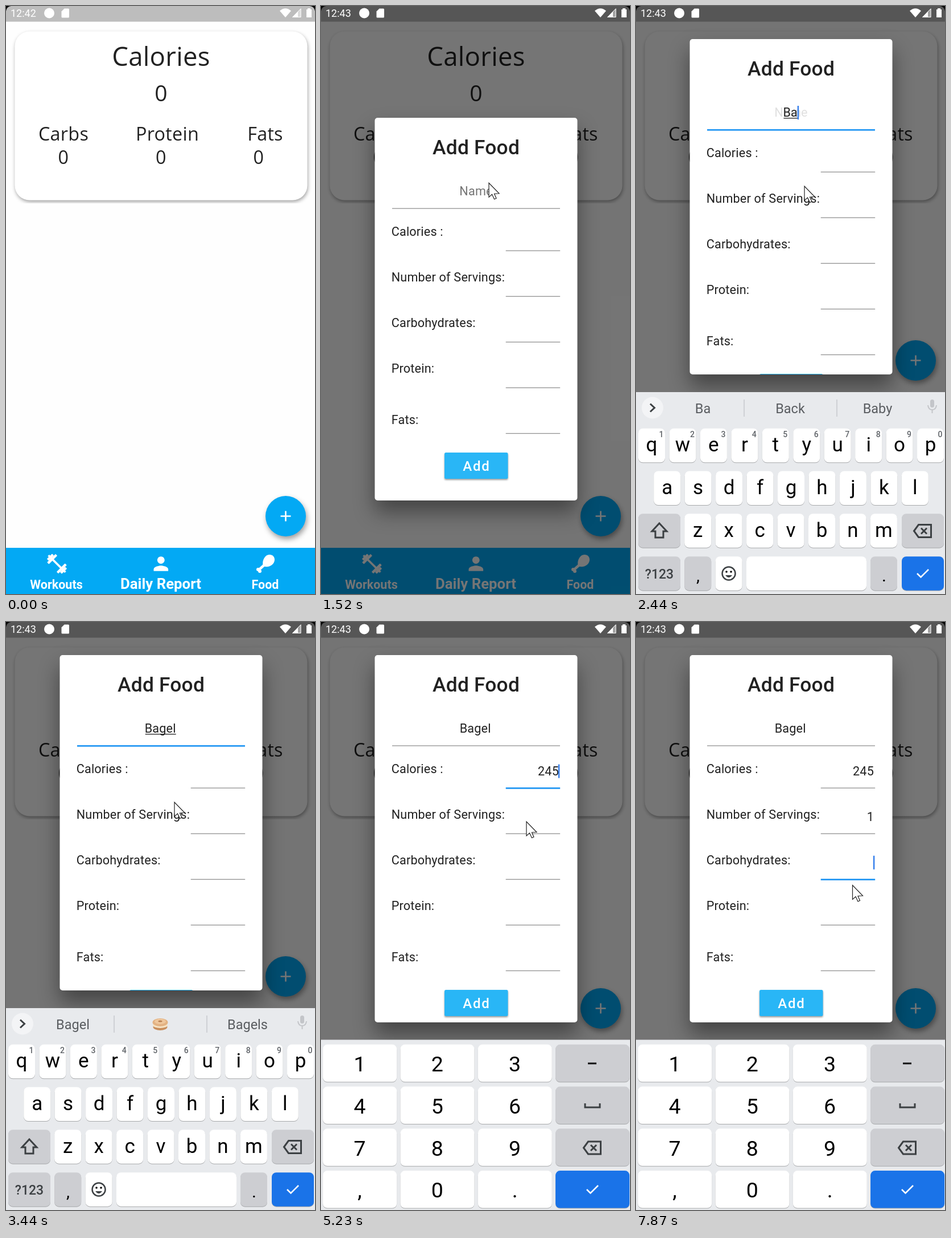
An HTML page for the animation above (8 s loop, 543 by 1031 pixels).

```html
<!DOCTYPE html>
<html lang="en">
<head>
<meta charset="utf-8">
<title>Add Food</title>
<style>
html, body { margin: 0; width: 100%; height: 100%; overflow: hidden; background: #000; }
svg { display: block; width: 100vw; height: 100vh; font-family: Roboto, sans-serif; }
text { white-space: pre; }
.mid { text-anchor: middle; }
.end { text-anchor: end; }
.card { fill: #fff; filter: drop-shadow(1px 3px 3px rgba(0,0,0,.36)); }
.head { font-family: 'Open Sans', 'Noto Sans', sans-serif; fill: #212121; letter-spacing: .3px; }
.nav { font-weight: 700; fill: #fff; }
.body { font-size: 21.6px; letter-spacing: .2px; fill: #212121; }
.lift { filter: drop-shadow(2px 5px 5px rgba(0,0,0,.38)); }
.sheet { fill: #fff; filter: drop-shadow(0 20px 18px rgba(0,0,0,.42)); }
.key { fill: #fff; filter: drop-shadow(0 1.3px .4px rgba(0,0,0,.28)); }
.gray { fill: #cdced2; }
.blue { fill: #1a73e8; }
.ink { fill: none; stroke: #3c4043; stroke-width: 3; }
.sug { font-size: 23.5px; fill: #5a5d61; }
</style>
</head>
<body>
<svg id="stage" viewBox="0 0 543 1031" preserveAspectRatio="none">
  <defs>
    <clipPath id="cut"><rect id="cutBox" x="94.5" y="196" width="356" height="671" rx="5"/></clipPath>
    <clipPath id="cardCut"><rect y="28" width="543" height="318"/></clipPath>
  </defs>

  <rect width="543" height="1031" fill="#fefefe"/>
  <rect width="543" height="12"/>
  <path d="M0 27.500V9Q1 1 9 0H534Q542 1 543 9V27.500Z" fill="#bdbdbd"/>
  <g clip-path="url(#cardCut)"><rect class="card" x="15.500" y="44.500" width="514" height="296" rx="26"/></g>
  <g class="head mid">
    <text x="272.500" y="105" font-size="45.500">Calories</text>
    <text x="272.500" y="167" font-size="39">0</text>
    <g font-size="32.300">
      <text x="101" y="235.500">Carbs</text><text x="283.500" y="235.500">Protein</text><text x="455.500" y="235.500">Fats</text>
      <text x="101" y="277">0</text><text x="272.500" y="277">0</text><text x="444" y="277">0</text>
    </g>
  </g>
  <g id="fab">
    <circle class="lift" cx="491.500" cy="894.500" r="35.500" fill="#03a9f4"/>
    <circle id="ripple" cx="491.500" cy="894.500" fill="#fff"/>
    <path d="M482.500 894.500h18M491.500 885.500v18" stroke="#fff" stroke-width="2.600"/>
  </g>
  <rect y="950" width="543" height="81" fill="#03a9f4"/>
  <g fill="#fff">
    <g transform="translate(89.500 978) rotate(45)">
      <rect x="-21" y="-1.800" width="42" height="3.600"/>
      <rect x="-14" y="-10.500" width="4.500" height="21" rx="1"/><rect x="9.500" y="-10.500" width="4.500" height="21" rx="1"/>
      <rect x="-18.500" y="-6.500" width="4.500" height="13" rx="1"/><rect x="14" y="-6.500" width="4.500" height="13" rx="1"/>
    </g>
    <path transform="translate(253.100 958.800) scale(1.6)" d="M12 12c2.210 0 4-1.790 4-4s-1.790-4-4-4-4 1.790-4 4 1.790 4 4 4zm0 2c-2.670 0-8 1.340-8 4v2h16v-2c0-2.660-5.330-4-8-4z"/>
    <path d="M452 982C449 973 455 962 463 962C469 962 472 966 472 971C472 979 462 986 452 982Z"/>
    <path d="M454 980L445 988" stroke="#fff" stroke-width="4.500"/>
    <circle cx="443" cy="988" r="3"/><circle cx="446" cy="991" r="3"/>
  </g>
  <g class="nav mid">
    <text x="88.500" y="1022" font-size="21.500">Workouts</text>
    <text x="272" y="1022" font-size="25.800">Daily Report</text>
    <text x="455.500" y="1022" font-size="21.500">Food</text>
  </g>

  <rect id="dim" width="543" height="1031" fill-opacity=".54"/>
  <g fill="#fff">
    <text id="clock" x="8" y="19" font-size="18"></text>
    <circle cx="76" cy="12.500" r="9"/>
    <path d="M102.500 4.500H109.500Q111 4.500 111 6V19Q111 20.500 109.500 20.500H99Q97.500 20.500 97.500 19V9.500Z"/>
    <path d="M481 8.500Q491 0 501 8.500L491 20Z"/>
    <path d="M503 20L518.500 4V20Z" fill-opacity=".45"/><path d="M503 20L513 9.500V20Z"/><path d="M503.500 19.500L518 4.800V19.500Z" fill="none" stroke="#fff"/>
    <path d="M530 6V4H535V6H537V20H528V6Z"/>
  </g>

  <g id="dialog">
    <rect id="sheet" class="sheet" x="94.500" y="196" width="356" height="671" rx="5"/>
    <g clip-path="url(#cut)">
      <text class="mid" x="272.600" y="260" font-size="35.300" font-weight="500" letter-spacing=".2" fill="#212121">Add Food</text>
      <g id="form"></g>
      <rect x="217" y="783" width="111.500" height="46" rx="2.500" fill="#29b6f6" style="filter:drop-shadow(0 2px 1.500px rgba(0,0,0,.4))"/>
      <text class="mid" x="273.500" y="814.500" font-size="24" font-weight="500" letter-spacing="1.750" fill="#fff">Add</text>
    </g>
  </g>

  <g id="letters"></g>
  <g id="digits"></g>
  <path id="arrow" d="M0 0V25L5.500 20L9.500 28.500L13 27L9.500 19L18 18.500Z" fill="#fff" stroke="#222" stroke-width="1.200"/>
</svg>

<script>
const $ = id => document.getElementById(id);
const LOOP = 8000;

// ---- form fields
const labels = ['Calories :', 'Number of Servings:', 'Carbohydrates:', 'Protein:', 'Fats:'];
const lineY = i => i ? 349 + 80.1 * i : 355;
$('form').innerHTML =
  '<text id="hint" class="body mid" x="272.500" y="332" style="fill:#757575">Name</text>' +
  '<text id="v0" class="body mid" x="271.200" y="332"></text><rect id="under" y="334" height="1.300" fill="#212121"/>' +
  labels.map((s, i) => `<text class="body" x="123.700" y="${403 + 80.1 * i + (i > 3 ? 9.500 : 0)}">${s}</text>`).join('') +
  [1, 2].map(i => `<text id="v${i}" class="body end" x="418" y="${lineY(i) - 22.5}"></text>`).join('') +
  [0, 1, 2, 3, 4, 5].map(i => `<rect id="line${i}" x="${i ? 324.700 : 125}" width="${i ? 95.500 : 295}"/>`).join('') +
  '<rect id="caret" width="2.600" height="24" fill="#3b82ec"/>';

// ---- keyboards
const key = (x, y, w, h, cls = '') => `<rect class="key ${cls}" x="${x}" y="${y}" width="${w}" height="${h}" rx="8"/>`;
const label = (x, y, size, s, extra = '') => `<text class="mid" x="${x}" y="${y}" font-size="${size}" ${extra}>${s}</text>`;
const icon = (x, y, d, extra = '') => `<path class="ink" transform="translate(${x} ${y})" d="${d}" ${extra}/>`;
const ERASE = 'M-15 0L-7 -11H15V11H-7ZM-2.500 -5L7.500 5M7.500 -5L-2.500 5';
const CHECK = 'M-10 0L-3.500 6.500L10 -7';
const white = 'style="stroke:#fff;stroke-width:2.600"';

function letterBoard() {
  const step = 54.45, w = 47, h = 59.5;
  let s = '<rect y="677" width="543" height="354" fill="#e8eaed"/>' +
    '<circle cx="29" cy="704.500" r="19" fill="#f3f4f6"/>' + icon(29, 704.5, 'M-4 -7L3.500 0L-4 7', 'stroke-width="2.600"') +
    '<g stroke="#c3c5c9" fill="none" stroke-width="2"><rect x="518" y="691" width="5" height="12" rx="2.500" fill="#c3c5c9"/><path d="M513 700Q514 708 520.500 708Q527 708 528 700M520.500 708V714"/></g>' +
    '<g id="sugs"><path d="M190 690V720M353 690V720" stroke="#c2c4c8" stroke-width="1.300"/>' +
    [117.5, 271, 424.5].map((x, i) => `<text id="s${i}" class="sug mid" x="${x}" y="714"></text>`).join('') + '</g>' +
    '<g id="bagel"><ellipse cx="271" cy="710" rx="12.500" ry="6" fill="#c98f5d"/><ellipse cx="271" cy="707" rx="13" ry="5" fill="#f6e3c4"/>' +
    '<ellipse cx="271" cy="702" rx="13.500" ry="7" fill="#e3b282"/><ellipse cx="271" cy="700.500" rx="10" ry="4.500" fill="#efc79c"/><ellipse cx="271" cy="700" rx="3.500" ry="1.500" fill="#b98152"/></g>';
  ['qwertyuiop', 'asdfghjkl', 'zxcvbnm'].forEach((row, r) => [...row].forEach((c, i) => {
    const x = [4, 31.2, 85.2][r] + step * i, y = 740.8 + 74.7 * r;
    s += key(x, y, w, h) + label(x + w / 2, y + 40.3, 35, c);
    if (!r) s += label(x + 40.5, y + 15, 14, (i + 1) % 10, 'font-weight="500" fill="#5f6368"');
  }));
  const y = 965.2;
  return s + key(4, 890.2, 74, h, 'gray') + key(467, 890.2, 74, h, 'gray') +
    icon(41, 920, 'M0 -13L13 1H7V12H-7V1H-13Z', 'stroke-width="2.600"') + icon(503.5, 920.5, ERASE) +
    key(4, y, 74, h, 'gray') + label(41, 1003.5, 23, '?123', 'font-weight="500" fill="#3c4043"') +
    key(85.2, y, w, h, 'gray') + label(109, 1009, 30, ',') + key(139.6, y, w, h) +
    '<circle class="ink" cx="163" cy="995" r="11.500" style="stroke-width:2.500"/><circle cx="159" cy="992" r="1.800"/><circle cx="167" cy="992" r="1.800"/>' +
    icon(163, 998, 'M-6 0Q0 8 6 0Z', 'style="fill:#3c4043;stroke:none"') +
    key(194, y, 211, h) + key(412, y, w, h, 'gray') + label(436, 1009, 30, '.') +
    key(467, y, 74, h, 'blue') + icon(504, 995, CHECK, white);
}

function digitBoard() {
  let s = '<rect y="732.500" width="543" height="299" fill="#e8eaed"/>';
  ['123-', '456_', '789<', ',0.!'].forEach((row, r) => [...row].forEach((c, i) => {
    const x = 3.2 + 136.3 * i, y = 740.8 + 73.75 * r;
    s += key(x, y, 130, 65.5, i < 3 ? '' : r < 3 ? 'gray' : 'blue');
    if (i < 3) s += label(x + 64.8, y + 47.2, 37.5, c);
  }));
  return s + icon(476.5, 774, 'M-7.500 0H7.500', 'style="stroke:#111"') + icon(477, 847, 'M-13 -3V4H13V-3') +
    icon(476.5, 922, ERASE) + icon(477, 995, CHECK, white);
}
$('letters').innerHTML = letterBoard();
$('digits').innerHTML = digitBoard();

// ---- timing: eased track of [time, value...] and last step reached
const ease = p => p * p * (3 - 2 * p);
function track(t, keys) {
  let a = keys[0];
  for (const b of keys) {
    if (t < b[0]) {
      const p = b === a ? 0 : ease((t - a[0]) / (b[0] - a[0]));
      return a.slice(1).map((v, i) => v + (b[i + 1] - v) * p);
    }
    a = b;
  }
  return a.slice(1);
}
const step = (t, list) => list.reduce((v, [at, x]) => t >= at ? x : v, list[0][1]);

const path = [[140, 508, 969], [680, 484, 884], [830, 484, 884], [1500, 295, 310], [1680, 296, 316],
  [3440, 296, 316], [4150, 348, 270], [5030, 348, 270], [5230, 361, 350], [5390, 361, 361], [5770, 361, 361],
  [6240, 359, 402], [6560, 356, 417], [7210, 356, 417], [7330, 371, 446], [7540, 371, 446], [7720, 380.5, 461.5]];
const typed = [
  [[0, ''], [2360, 'B'], [2440, 'Ba'], [2530, 'Bag'], [2670, 'Bage'], [2820, 'Bagel']],
  [[0, ''], [5080, '2'], [5150, '24'], [5220, '245']],
  [[0, ''], [5840, '1']]];
const words = [[0, ['', '', '']], [2360, ['B', 'Be', 'But']], [2440, ['Ba', 'Back', 'Baby']], [2530, ['Bag', 'Bags', 'Bagged']],
  [2670, ['Bage', 'Bagel', 'Baggage']], [2820, ['Bage', 'Bagel', 'Bagels']], [2970, ['Bagel', '', 'Bagels']]];
const focus = [[0, -1], [1720, 0], [4450, 1], [5540, 2], [6960, 3]];
const blink = [[0, 0], [1800, 1], [3440, 0], [3950, 1], [6320, 0], [6960, 1], [7320, 0], [7870, 1]];

const set = (el, o) => { for (const k in o) el.setAttribute(k, o[k]); };
const show = (id, on) => { $(id).style.display = on ? '' : 'none'; };

function draw(t) {
  $('clock').textContent = t < 1000 ? '12:42' : '12:43';
  const [fade] = track(t, [[830, 0], [1040, 1]]);
  $('dim').style.opacity = $('dialog').style.opacity = fade;
  const [r, o] = track(t, [[680, 0, .3], [880, 35.5, .25], [1040, 35.5, 0]]);
  set($('ripple'), { r, opacity: o });

  const [top, bottom, lift] = track(t, [[1760, 196, 867, 0], [1990, 58, 646, -273], [4600, 58, 646, -273], [4760, 58, 702, -217]]);
  set($('dialog'), { transform: `translate(0 ${top - 196})` });
  set($('sheet'), { height: bottom - top });
  set($('cutBox'), { height: bottom - top });
  set($('fab'), { transform: `translate(0 ${lift})` });
  set($('letters'), { transform: `translate(0 ${track(t, [[1740, 354], [2050, 0]])[0]})` });
  show('letters', t >= 1740 && t < 4600);
  show('digits', t >= 4600);

  const f = step(t, focus);
  typed.forEach((list, i) => { $('v' + i).textContent = step(t, list); });
  for (let i = 0; i < 6; i++) {
    const on = i === f, h = on ? 2.7 : 1.3;
    set($('line' + i), { y: lineY(i) - h / 2 + (on ? .3 : 0), height: h, fill: on ? '#2196f3' : '#929292' });
  }
  const name = $('v0').textContent, w = name ? $('v0').getComputedTextLength() : 0;
  set($('under'), { x: 271.2 - w / 2 + 1, width: Math.max(0, w - 1) });
  show('under', name && f === 0);
  $('hint').style.opacity = track(t, [[2360, 1], [2440, .22], [2530, 0]])[0];
  set($('caret'), { x: f < 1 ? 270.8 + w / 2 : 416.8, y: f < 1 ? 313 : lineY(f) - 41.5 });
  show('caret', step(t, blink) && f >= 0);

  step(t, words).forEach((s, i) => { $('s' + i).textContent = s; });
  show('sugs', t >= 2360);
  show('bagel', t >= 2970);

  const [x, y] = track(t, path);
  set($('arrow'), { transform: `translate(${x} ${y})` });
  show('arrow', t >= 140);
}

const start = performance.now();
function tick() {
  draw((performance.now() - start) % LOOP);
  requestAnimationFrame(tick);
}
draw(0);
requestAnimationFrame(tick);
</script>
</body>
</html>
```
